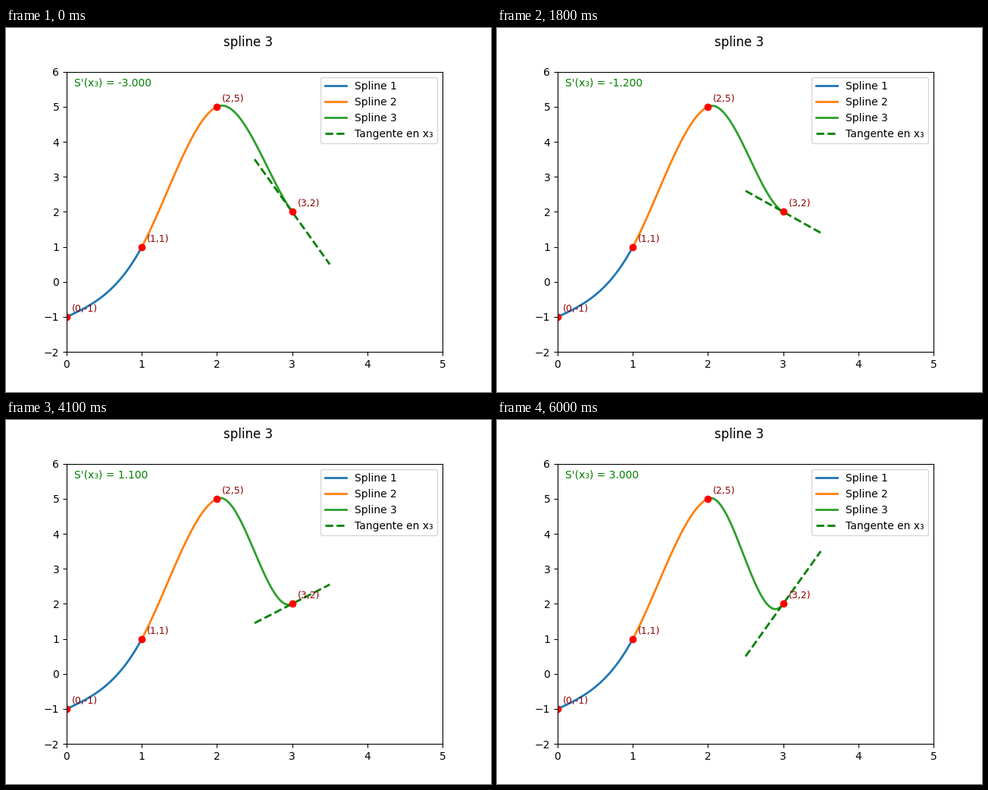
Write a matplotlib script that moves like this. It is 640x480 px and loops after 6100 ms.

```python
import matplotlib.pyplot as plt
import numpy as np
from matplotlib.animation import FuncAnimation

KNOTS = [(0, -1), (1, 1), (2, 5), (3, 2)]
INNER_SLOPES = [1, 4, 1]  # natural spline slopes at the first three knots
END_SLOPES = np.linspace(-3, 3, 61)

t = np.linspace(0, 1, 100)
tangent_x = np.array([2.5, 3.5])


def hermite(y0, y1, m0, m1):
    """Cubic on the unit interval with given end values and slopes."""
    rise = y1 - y0
    b = 3 * rise - 2 * m0 - m1
    c = m0 + m1 - 2 * rise
    return y0 + m0 * t + b * t**2 + c * t**3


fig, ax = plt.subplots(figsize=(6.4, 4.8), dpi=100)
fig.suptitle("spline 3")
ax.set_xlim(0, 5)
ax.set_ylim(-2, 6)

for i in range(2):
    (x0, y0), (_, y1) = KNOTS[i:i + 2]
    ax.plot(x0 + t, hermite(y0, y1, *INNER_SLOPES[i:i + 2]),
            lw=2, label=f"Spline {i + 1}")
last_curve, = ax.plot([], [], lw=2, label="Spline 3")
tangent, = ax.plot([], [], "--", color="green", lw=2, label="Tangente en x₃")

ax.plot(*zip(*KNOTS), "ro")
for x, y in KNOTS:
    ax.annotate(f"({x},{y})", (x, y), xytext=(5, 5),
                textcoords="offset points", fontsize=9, color="darkred")

slope_text = ax.text(0.02, 0.95, "", transform=ax.transAxes, color="green")
ax.legend(loc="upper right")


def update(frame):
    slope = END_SLOPES[frame]
    (x2, y2), (x3, y3) = KNOTS[2:]
    last_curve.set_data(x2 + t, hermite(y2, y3, INNER_SLOPES[2], slope))
    tangent.set_data(tangent_x, y3 + slope * (tangent_x - x3))
    slope_text.set_text(f"S'(x₃) = {slope:.3f}")
    return last_curve, tangent, slope_text


anim = FuncAnimation(fig, update, frames=len(END_SLOPES), interval=100,
                     repeat=True, repeat_delay=0)
plt.show()
```
